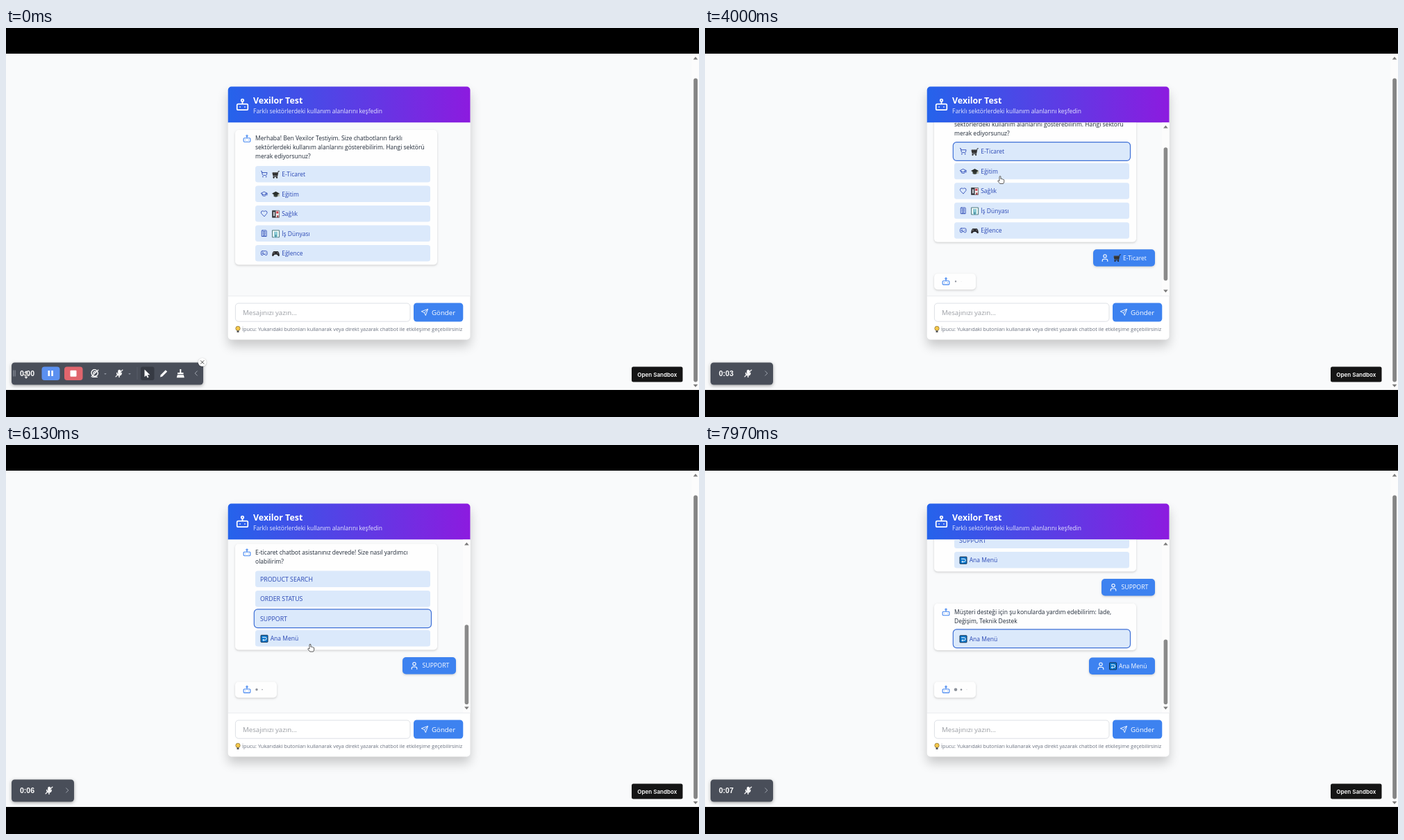
Write an HTML page with a canvas that moves like this. It is 998 px wide and 561 px high and loops after 8000 ms.

```html
<!DOCTYPE html>
<html lang="tr">
<head>
<meta charset="utf-8">
<title>Chat</title>
<style>
html, body { margin: 0; width: 100%; height: 100%; overflow: hidden; background: #000; }
canvas { display: block; width: 998px; height: 561px; }
</style>
</head>
<body>
<canvas id="stage"></canvas>
<script>
const W = 998, H = 561, LOOP = 8000;
const canvas = document.getElementById('stage');
const dpr = window.devicePixelRatio || 1;
canvas.width = W * dpr;
canvas.height = H * dpr;
const c = canvas.getContext('2d');
const SANS = '"Open Sans", "Noto Sans", sans-serif';
const BLUE = '#3d82f0', NAVY = '#2846b4';

// Line icons on a 24 unit grid
const dot = (x, y, r) => `M${x - r} ${y}a${r} ${r} 0 1 0 ${2 * r} 0a${r} ${r} 0 1 0 ${-2 * r} 0`;
const ICONS = {
  bot: 'M5 11h14a2 2 0 0 1 2 2v6a2 2 0 0 1-2 2H5a2 2 0 0 1-2-2v-6a2 2 0 0 1 2-2zM12 7v4M8 16h.01M16 16h.01' + dot(12, 5, 2),
  cart: 'M2 2h2l2.7 12.4a2 2 0 0 0 2 1.6h9.8a2 2 0 0 0 2-1.6L22 7H5.1' + dot(8, 21, 1) + dot(19, 21, 1),
  cap: 'M22 10v6M2 10l10-5 10 5-10 5zM6 12v5c3 3 9 3 12 0v-5',
  heart: 'M19 14c1.5-1.5 3-3.2 3-5.5A5.5 5.5 0 0 0 16.5 3c-1.8 0-3 .5-4.5 2-1.5-1.5-2.7-2-4.5-2A5.5 5.5 0 0 0 2 8.5c0 2.3 1.5 4 3 5.5l7 7z',
  tower: 'M6 2h12a2 2 0 0 1 2 2v18H4V4a2 2 0 0 1 2-2zM9 22v-4h6v4M8 6h8M8 10h8M8 14h8',
  pad: 'M6 12h4M8 10v4M15 13h.01M18 11h.01M6 5h12a4 4 0 0 1 4 4v6a4 4 0 0 1-4 4q-2 0-3-3H9q-1 3-3 3a4 4 0 0 1-4-4V9a4 4 0 0 1 4-4z',
  send: 'M22 2l-7 20-4-9-9-4zM22 2L11 13',
  user: 'M19 21v-2a4 4 0 0 0-4-4H9a4 4 0 0 0-4 4v2' + dot(12, 7, 4),
  mic: 'M3 21L21 3M10 12V6a2.5 2.5 0 0 1 5 0v6a2.5 2.5 0 0 1-5 0M12.5 4v9M6 11a6 6 0 0 0 12 0M12 18v4',
  cam: 'M3 21L21 3M5 16a8 8 0 0 1 12-11M19 8a8 8 0 0 1-12 10M9 14a4 4 0 0 1 5-6M6 22h12',
  left: 'M15 5l-7 7 7 7',
  right: 'M9 5l7 7-7 7',
  close: 'M5 5l14 14M19 5L5 19'
};

function box(x, y, w, h, r, fill, stroke, lw = 1) {
  c.beginPath();
  c.roundRect(x, y, w, h, r);
  if (fill) { c.fillStyle = fill; c.fill(); }
  if (stroke) { c.strokeStyle = stroke; c.lineWidth = lw; c.stroke(); }
}

function shadowed(color, blur, dy, draw) {
  c.save();
  c.shadowColor = color;
  c.shadowBlur = blur * dpr;
  c.shadowOffsetY = dy * dpr;
  draw();
  c.restore();
}

function text(s, x, y, size, color, weight = 400, family = SANS) {
  c.font = `${weight} ${size}px ${family}`;
  c.fillStyle = color;
  c.fillText(s, x, y);
}

function at(cx, cy, scale, draw) {
  c.save();
  c.translate(cx, cy);
  c.scale(scale, scale);
  draw();
  c.restore();
}

function icon(name, cx, cy, size, color, lw = 2) {
  at(cx, cy, size / 24, () => {
    c.translate(-12, -12);
    c.strokeStyle = color;
    c.lineWidth = lw;
    c.lineCap = c.lineJoin = 'round';
    c.stroke(new Path2D(ICONS[name]));
  });
}

function shape(d, fill, stroke, lw) {
  const p = new Path2D(d);
  if (fill) { c.fillStyle = fill; c.fill(p); }
  if (stroke) { c.strokeStyle = stroke; c.lineWidth = lw; c.stroke(p); }
}

// Small pictograms, about 11 px wide, centred on the origin
const PICTO = {
  cart() {
    shape('M-5.2-3H3L2.4 2.2H-4z', '#5a5a5a');
    shape('M5.4-4.7H3.6L2 3.2H-4M-4.8-1H2.6M-4.4.7H2.4M-3-3V2M-.8-3V2M1.2-3V2', null, '#262626', 0.9);
    shape(dot(-3, 4.5, 1.1) + dot(1.6, 4.5, 1.1), '#262626');
  },
  cap() {
    shape('M-3-.5V3Q0 5 3 3V-.5z', '#3d463f');
    shape('M-5.5-1L0-4 5.5-1 0 2z', '#2b302d');
    shape('M4.5-1V3', null, '#8a8140', 0.8);
  },
  clinic() {
    box(-5, -5, 10, 10, 0, '#f3f3f3', '#444', 0.7);
    box(-5, -5, 5, 10, 0, '#30343c');
    box(-3.6, -3, 2.2, 6, 0, '#c9ccd2');
    box(0.8, -3.7, 3, 3, 0, '#cf3340');
    box(1.6, 2, 2.4, 3, 0, '#a6434a');
  },
  tower() {
    box(-5, -5, 10, 10, 0, '#f2fbf8', '#3f6f72', 0.9);
    box(-2.5, -3, 5, 8, 0, '#8dcbd6');
    box(-0.8, 1.5, 1.6, 3.5, 0, '#3e7f92');
  },
  pad() {
    shape('M-3.2-3.2H3.2Q5-2 5.4 2.2 5 5 3 3L1.6 1.4H-1.6L-3 3Q-5 5-5.4 2.2-5-2-3.2-3.2z', '#2b2b2f');
    shape('M-3.8-1H-1.6M-2.7-2.1V.1', null, '#999', 0.6);
    shape(dot(2.7, -1, 0.7), '#999');
  },
  back() {
    box(-5, -5, 10, 10, 0.6, '#0a78cf', '#12304f', 1);
    shape('M-2.8-2H1.2Q3.2-2 3.2 0T1.2 2H-2M-.6.6L-2.2 2-.6 3.4', null, '#fff', 1);
  },
  bulb() {
    shape(dot(0, -1.2, 3.2), '#f5c84a', '#6e5a2a', 0.6);
    box(-1.5, 1.8, 3, 2.8, 0.6, '#585858');
  }
};
const picto = (name, x, y) => at(x, y, 1, PICTO[name]);

const BACK = { label: 'Ana Menü', pic: 'back' };
const MESSAGES = [
  { at: 0, top: 147, lines: [
      'Merhaba! Ben Vexilor Testiyim. Size chatbotların farklı',
      'sektörlerdeki kullanım alanlarını gösterebilirim. Hangi sektörü',
      'merak ediyorsunuz?'],
    buttons: [
      { label: 'E-Ticaret', icon: 'cart', pic: 'cart' },
      { label: 'Eğitim', icon: 'cap', pic: 'cap' },
      { label: 'Sağlık', icon: 'heart', pic: 'clinic' },
      { label: 'İş Dünyası', icon: 'tower', pic: 'tower' },
      { label: 'Eğlence', icon: 'pad', pic: 'pad' }] },
  { at: 3830, top: 352, left: 559, label: 'E-Ticaret', pic: 'cart' },
  { at: 4970, top: 387, lines: ['E-ticaret chatbot asistanınız devrede! Size nasıl yardımcı', 'olabilirim?'],
    buttons: [{ label: 'PRODUCT SEARCH' }, { label: 'ORDER STATUS' }, { label: 'SUPPORT' }, BACK] },
  { at: 5840, top: 550.5, left: 571, label: 'SUPPORT' },
  { at: 6980, top: 586, lines: ['Müşteri desteği için şu konularda yardım edebilirim: İade,', 'Değişim, Teknik Destek'],
    buttons: [BACK] },
  { at: 7560, top: 664, left: 553, label: 'Ana Menü', pic: 'back' }
];
const TYPING = [[3830, 4970, 387], [5840, 6980, 586], [7560, 8700, 699]];
const SCROLLS = [[3830, 45], [4970, 175], [5840, 244.5], [6980, 288.5], [7560, 357.5]];
const HOVERS = [[0, ''], [3650, '0.0'], [4300, '0.2'], [4980, ''], [5180, '2.0'], [5420, '2.1'],
  [5560, '2.2'], [5900, ''], [7420, '4.0'], [7700, '']];
const FOCUS = [[0, ''], [3830, '0.0'], [5840, '2.2'], [7560, '4.0']];
const POINTER = [[30, 29, 500], [370, 60, 470], [730, 60, 470], [1030, 590, 325], [1730, 590, 325],
  [2000, 640, 200], [2530, 480, 300], [3200, 420, 530], [3400, 420, 530], [3700, 425, 212],
  [4150, 425, 214], [4600, 413, 223], [4980, 413, 223], [5200, 436, 262], [5320, 438, 268],
  [5400, 438, 287], [5600, 438, 316], [5840, 438, 316], [6050, 438, 287], [6600, 438, 287],
  [7000, 430, 330], [7400, 417, 340], [7560, 417, 346]];

const ease = k => { k = Math.max(0, Math.min(1, k)); return k * k * (3 - 2 * k); };
const latest = (list, t) => list.filter(e => e[0] <= t).pop()[1];
const mix = (a, b, k) => a + (b - a) * k;

function scrollAt(t) {
  return SCROLLS.reduce((y, [start, to]) => mix(y, to, ease((t - start) / 260)), 0);
}

function pointerAt(t) {
  let [, x, y] = POINTER[0];
  for (let i = 1; i < POINTER.length; i++) {
    const [from] = POINTER[i - 1], [to, nx, ny] = POINTER[i];
    const k = ease((t - from) / (to - from));
    x = mix(x, nx, k);
    y = mix(y, ny, k);
  }
  return [x, y];
}

function labelText(s, x, y, color) {
  text(s, x, y, s === s.toUpperCase() ? 8.8 : 8.5, color);
}

function option(b, y, hover, focus) {
  box(359, y, 252, 23.5, 3.5, hover ? '#bfdbf8' : '#dbe9fb');
  if (focus) box(357.3, y - 1.6, 255.2, 26.7, 5, '#dbe9fb', '#3d6fd6', 1.2);
  const cy = y + 12;
  let x = 366;
  if (b.icon) { icon(b.icon, 371.7, cy - 0.3, 10.4, NAVY); x = 382.5; }
  if (b.pic) { picto(b.pic, x + 6, cy + 0.3); x += 14.7; }
  labelText(b.label, x, cy + 3, NAVY);
}

function bubble(x, y, w, h, fill) {
  shadowed('rgba(0,0,0,.17)', 3, 1.2, () => box(x, y, w, h, 5, fill));
}

function botMessage(m, i, t) {
  const first = m.top + 13 * m.lines.length + 13;
  bubble(330, m.top, 291, first + 28.5 * m.buttons.length - m.top, '#fefefe');
  icon('bot', 347, m.top + 12.3, 13, BLUE);
  m.lines.forEach((s, n) => text(s, 359, m.top + 15 + 13 * n, 8.5, '#1f2937'));
  m.buttons.forEach((b, n) => {
    const id = i + '.' + n;
    option(b, first + 28.5 * n, latest(HOVERS, t) === id, latest(FOCUS, t) === id);
  });
}

function userMessage(m) {
  bubble(m.left, m.top, 648 - m.left, 24.5, BLUE);
  icon('user', m.left + 17, m.top + 12.4, 13, '#fff');
  let x = m.left + 28.5;
  if (m.pic) { picto(m.pic, x + 6, m.top + 12.4); x += 14.5; }
  labelText(m.label, x, m.top + 15.3, '#fff');
}

function typing(start, top, t) {
  bubble(330, top, 60, 23, '#fefefe');
  icon('bot', 347, top + 11, 13, BLUE);
  for (let i = 0; i < 3; i++) {
    const p = ((t - start + 80 - 200 * i) / 1400) % 1;
    const s = p < 0 ? 0 : Math.max(0, 1 - Math.abs(p - 0.4) / 0.4);
    shape(dot(361 + 8 * i, top + 11.3, 2.6 * s), '#8d929b');
  }
}

function arrowMark(x, y, d) {
  shape(`M${x - 3.3} ${y + 2 * d}h6.6l-3.3 ${-4 * d}z`, '#7b7b7b');
}

function chat(t) {
  const scroll = scrollAt(t);
  c.save();
  c.beginPath();
  c.rect(320, 136.5, 348.5, 250);
  c.clip();
  c.fillStyle = '#f9fafb';
  c.fillRect(320, 136, 349, 251);
  c.save();
  c.translate(0, -scroll);
  let bottom = 342;
  MESSAGES.forEach((m, i) => {
    if (t < m.at) return;
    if (m.lines) botMessage(m, i, t); else userMessage(m);
    bottom = m.top + (m.lines ? 13 + 13 * m.lines.length + 28.5 * m.buttons.length : 24.5);
  });
  for (const [start, end, top] of TYPING) {
    if (t >= start && t < end) { typing(start, top, t); bottom = top + 23.5; }
  }
  c.restore();
  if (t >= MESSAGES[1].at) {
    const full = bottom + 21 - 136, track = 227;
    c.fillStyle = '#fcfcfc';
    c.fillRect(658, 136, 11, 251);
    const h = track * 250 / full;
    box(660.6, 147 + track * Math.min(scroll / full, 1 - 250 / full), 5.6, h, 2.8, '#8a8a8a');
    arrowMark(663.4, 142.5, 1);
    arrowMark(663.4, 379.5, -1);
  }
  c.restore();
}

function card(t) {
  shadowed('rgba(0,0,0,.2)', 16, 9, () => box(319.7, 84.5, 348.8, 365, 5, '#fff'));
  const g = c.createLinearGradient(320, 0, 668, 0);
  g.addColorStop(0, '#2563eb');
  g.addColorStop(1, '#8c1bdf');
  box(319.7, 84.5, 348.8, 52, [5, 5, 0, 0], g);
  icon('bot', 340.5, 110.4, 20.8, '#fff');
  text('Vexilor Test', 356, 109.3, 12.4, '#fff', 700);
  text('Farklı sektörlerdeki kullanım alanlarını keşfedin', 356, 123.2, 8.5, '#e6e8fd');
  chat(t);
  c.fillStyle = '#e8eaee';
  c.fillRect(320, 386, 348.5, 0.8);
  box(330.4, 397, 251.6, 26.2, 4.5, '#fff', '#d5d9df', 0.8);
  text('Mesajınızı yazın...', 341, 414, 9.7, '#9a9da3');
  box(587, 396.5, 71.3, 27, 4.5, BLUE);
  icon('send', 603, 410.2, 10.6, '#fff');
  text('Gönder', 613, 414, 9.7, '#fff', 500);
  picto('bulb', 334, 434.5);
  text('İpucu: Yukarıdaki butonları kullanarak veya direkt yazarak chatbot ile etkileşime geçebilirsiniz', 340, 437, 7.37, '#6b7280');
}

function tools() {
  box(10.3, 493.5, 1, 9, 0, '#9096a0');
  box(12.6, 493.5, 1, 9, 0, '#9096a0');
  box(51.5, 488.5, 26, 19.5, 4, '#5b90f0');
  box(60.5, 494, 2.6, 8, 0.5, '#fff');
  box(65.3, 494, 2.6, 8, 0.5, '#fff');
  box(84, 488.5, 26.5, 19.5, 4, '#e0656d');
  box(92.5, 493.7, 9, 9, 1, '#fff');
  icon('cam', 128, 498, 13, '#fff', 2.6);
  icon('mic', 163, 498, 13, '#fff', 2.6);
  for (const x of [143, 178]) shape(`M${x - 1.8} 498h3.6l-1.8 2z`, '#9298a3');
  box(188.6, 489, 0.8, 18, 0, '#5d626d');
  box(194, 488.5, 19.5, 19.5, 3, '#363a43');
  shape('M199.5 492.5v10.8l2.5-2.3 1.7 3.6 1.8-.9-1.7-3.4h3.5z', '#fff');
  shape('M222 503.5l.8-3.3 7-7 2.4 2.4-7 7z', '#fff');
  shape('M250.3 492h2v5h3.2v2.2h-8.4V497h3.2zM246.8 500.2h9l1 4h-11z', '#fff');
  icon('left', 274, 498, 11, '#a6abb5');
}

function toolbar(t) {
  const k = ease((t - 1750) / 300);
  const w = mix(276, 90, k);
  shadowed('rgba(0,0,0,.35)', 5, 1.5, () => box(8, 482.5, w, 32, 4.5, '#494e59'));
  c.save();
  c.beginPath();
  c.rect(8, 482, w, 33);
  c.clip();
  const sec = Math.floor(Math.max(0, t - 55) / 1000);
  text('0:0' + sec, 20, 501.8, 10.5, '#fff', 700, '"Liberation Sans", Arial, sans-serif');
  if (k < 1) tools();
  else {
    icon('mic', 62, 498, 13, '#fff', 2.6);
    icon('right', 88, 498, 11, '#a6abb5');
  }
  c.restore();
  if (t < 900) {
    shadowed('rgba(0,0,0,.3)', 2, 0.5, () => shape(dot(282.7, 482, 6), '#fff'));
    icon('close', 282.7, 482, 8, '#333', 2.6);
  }
}

function pointer(t) {
  if (t > 7900) return;
  const [x, y] = pointerAt(t);
  at(x, y, 1, () => {
    c.lineJoin = 'round';
    if (t < 30) {
      shape('M-4 0H4M0-4V4M-1.5-3L0-4.7 1.5-3M-1.5 3L0 4.7 1.5 3', null, '#fff', 1.6);
      shape('M-4 0H4M0-4V4', null, '#333', 0.6);
    } else if (t < 3600) {
      shape('M0 0V10.5L2.5 8.2 4.2 12 5.9 11.2 4.2 7.6H7.4z', '#fff', '#222', 0.8);
    } else {
      shape('M-1 .8Q0-.6 1 .8V4.2Q2 3.4 2.8 4.5 3.7 4 4.3 5 5.6 4.7 5.7 6V8Q5.5 9.8 4.5 11H-.3Q-1.6 9.4-3.3 7.3-3.2 5.6-1 7z', '#fff', '#333', 0.8);
    }
  });
}

function draw(t) {
  c.setTransform(dpr, 0, 0, dpr, 0, 0);
  c.fillStyle = '#000';
  c.fillRect(0, 0, W, H);
  c.save();
  c.beginPath();
  c.rect(0, 37, W, 485);
  c.clip();
  c.fillStyle = '#f9fafb';
  c.fillRect(0, 37, W, 485);
  card(t);
  c.fillStyle = '#fcfcfc';
  c.fillRect(987.5, 37, 11, 485);
  box(990.2, 72.5, 5.8, 438, 2.9, '#858585');
  arrowMark(993, 43.5, 1);
  arrowMark(993, 516, -1);
  box(901, 488.5, 73.5, 22, 2.5, '#151515');
  text('Open Sandbox', 909.3, 502.7, 8.05, '#fff', 600, 'Inter, sans-serif');
  toolbar(t);
  pointer(t);
  c.restore();
}

const begun = performance.now();
function tick() {
  draw((performance.now() - begun) % LOOP);
  requestAnimationFrame(tick);
}
tick();
</script>
</body>
</html>
```
